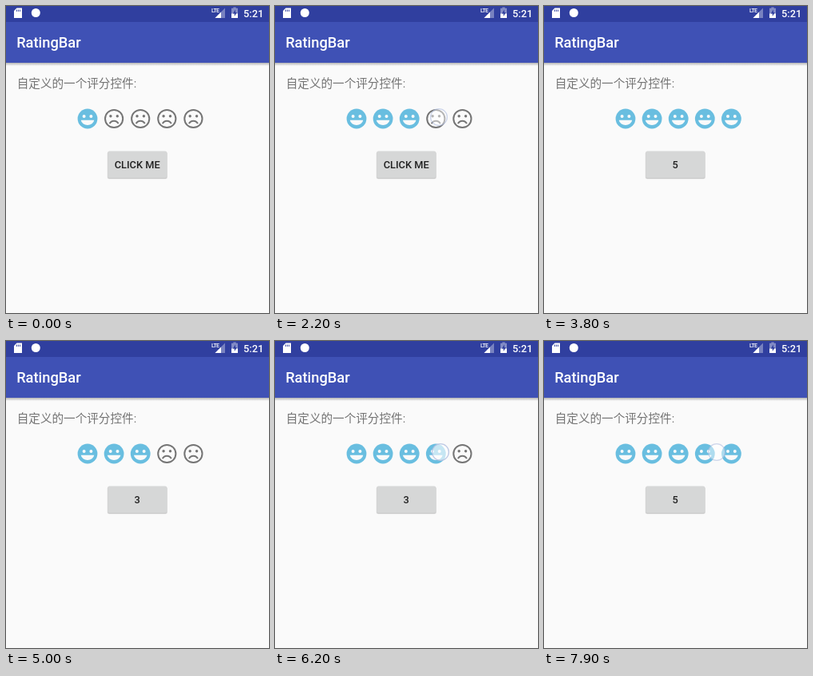
Animation, 329 px wide and 384 px high, one loop 8000 ms. Source, as an HTML page:

```html
<!DOCTYPE html>
<html lang="zh-CN">
<head>
<meta charset="utf-8">
<title>RatingBar</title>
<style>
  html, body { margin: 0; width: 100%; height: 100%; overflow: hidden; background: #fafafa; }
  svg { display: block; width: 329px; height: 384px; font-family: Roboto, "Noto Sans CJK SC", "Noto Sans CJK", sans-serif; }
  .medium { font-weight: 500; }
</style>
</head>
<body>
<svg viewBox="0 0 329 384">
  <defs>
    <linearGradient id="shade" x2="0" y2="1">
      <stop stop-color="#000" stop-opacity=".28"/>
      <stop offset="1" stop-color="#000" stop-opacity="0"/>
    </linearGradient>
    <g id="happy">
      <circle r="12.4" fill="#69bee0"/>
      <g fill="#fafafa">
        <circle cx="-4.4" cy="-3" r="2"/>
        <circle cx="4.4" cy="-3" r="2"/>
        <path d="M-8.3 1.8H8.3A8.4 7.4 0 0 1-8.3 1.8"/>
      </g>
    </g>
    <g id="sad" fill="#757575">
      <circle r="11.1" fill="none" stroke="#757575" stroke-width="2"/>
      <circle cx="-4.2" cy="-3.2" r="1.7"/>
      <circle cx="4.2" cy="-3.2" r="1.7"/>
      <path d="M-5.5 6.2C-3.3 1.5 3.3 1.5 5.5 6.2" fill="none" stroke="#757575" stroke-width="1.9"/>
    </g>
  </defs>

  <rect width="329" height="384" fill="#fafafa"/>
  <rect y="71" width="329" height="4" fill="url(#shade)"/>
  <rect width="329" height="71" fill="#3f51b5"/>
  <rect width="329" height="20" fill="#303f9f"/>

  <g fill="#fff">
    <path d="M13.5 2.5H20V15H10V6Z"/>
    <path d="M13.5 4.5v2.5M15.5 4.5v2.5M17.5 4.5v2.5" stroke="#303f9f" stroke-width=".9"/>
    <circle cx="37.3" cy="8.5" r="5.5"/>
    <path d="M274 2.5V15H261.5Z" opacity=".35"/>
    <path d="M269 7.5V15H261.5Z"/>
    <text x="257" y="7.5" font-size="7" class="medium" letter-spacing="-.7">LTE</text>
    <path d="M284.3 2.8V1.5h3.4v1.3H290V15H282V2.8Z" opacity=".4"/>
    <path d="M282 9.5h8V15h-8Z"/>
    <path d="M287 4.5l-3.2 5h2v3.5l3-5h-1.8Z" fill="#303f9f"/>
    <text x="297" y="13.6" font-size="12.8" class="medium">5:21</text>
    <text x="13.2" y="52.4" font-size="18.3" class="medium">RatingBar</text>
  </g>

  <text x="13.7" y="102" font-size="14.6" fill="#737373">自定义的一个评分控件:</text>
  <g id="faces"></g>

  <rect x="126.7" y="182" width="75.2" height="34.6" rx="2.5" fill="#000" opacity=".09"/>
  <rect x="127.2" y="182.5" width="74.2" height="33.5" rx="2" fill="#000" opacity=".12"/>
  <rect id="button" x="127.3" y="181.5" width="73.8" height="33.5" rx="2"/>
  <text id="label" x="164.2" y="203.3" font-size="12.8" class="medium" text-anchor="middle" fill="#212121"></text>

  <circle id="finger" r="10.4" fill="#fff" fill-opacity=".62" stroke="#b3bfe0" stroke-opacity=".85" stroke-width="1.3"/>
</svg>
<script>
const $ = id => document.getElementById(id);
const LOOP = 8000, STEP = 100;

// Touches on the faces: start, end, then [time, x] points
const touches = [
  [1200, 1400, [1200, 137]],
  [1600, 1800, [1600, 175]],
  [2200, 2400, [2200, 205]],
  [2600, 2800, [2600, 221]],
  [4000, 4300, [4000, 168]],
  [5400, 6600, [5400, 44], [6200, 207], [6300, 217]],
  [7700, 8000, [7700, 276], [7900, 216]],
];
// Button presses: start, end, time the tint lingers
const presses = [[3300, 3500, 0], [4500, 4800, 200], [6900, 7200, 500]];

const faces = [0, 1, 2, 3, 4].map(i => {
  const use = document.createElementNS("http://www.w3.org/2000/svg", "use");
  use.setAttribute("transform", `translate(${102 + 33.1 * i} 141)`);
  return $("faces").appendChild(use);
});

function along(points, t) {
  for (let i = 1; i < points.length; i++) {
    const [t0, x0] = points[i - 1], [t1, x1] = points[i];
    if (t < t1) return x0 + (x1 - x0) * (t - t0) / (t1 - t0);
  }
  return points[points.length - 1][1];
}

function ratingAt(t) {
  const last = touches.filter(([start]) => t > start).pop();
  if (!last) return 1;
  const x = along(last.slice(2), t);
  return Math.max(0, Math.min(5, Math.floor((x - 79) / 33) + 1));
}

function moveFinger(x, y, opacity) {
  $("finger").setAttribute("cx", x);
  $("finger").setAttribute("cy", y);
  $("finger").setAttribute("opacity", opacity);
}

function draw(t) {
  const rating = ratingAt(t);
  faces.forEach((face, i) => face.setAttribute("href", i < rating ? "#happy" : "#sad"));

  const isOn = ([start, end]) => t >= start && t < end;
  const touch = touches.find(isOn), press = presses.find(isOn);
  if (touch) {
    const fading = t === touch[0] || t === touch[1] - STEP;
    moveFinger(along(touch.slice(2), t), 139, fading ? .75 : 1);
  } else if (press) moveFinger(168, 207.5, .8);
  else moveFinger(0, 0, 0);

  const clicked = presses.filter(([, end]) => t >= end - STEP).pop();
  $("label").textContent = clicked ? ratingAt(clicked[1]) : "CLICK ME";
  const lingering = clicked && t < clicked[1] + clicked[2];
  $("button").setAttribute("fill", press ? "#cacbcb" : lingering ? "#cfd1d0" : "#d6d7d7");
}

function tick() {
  draw(Math.floor(performance.now() % LOOP / STEP) * STEP);
  requestAnimationFrame(tick);
}
tick();
</script>
</body>
</html>
```
